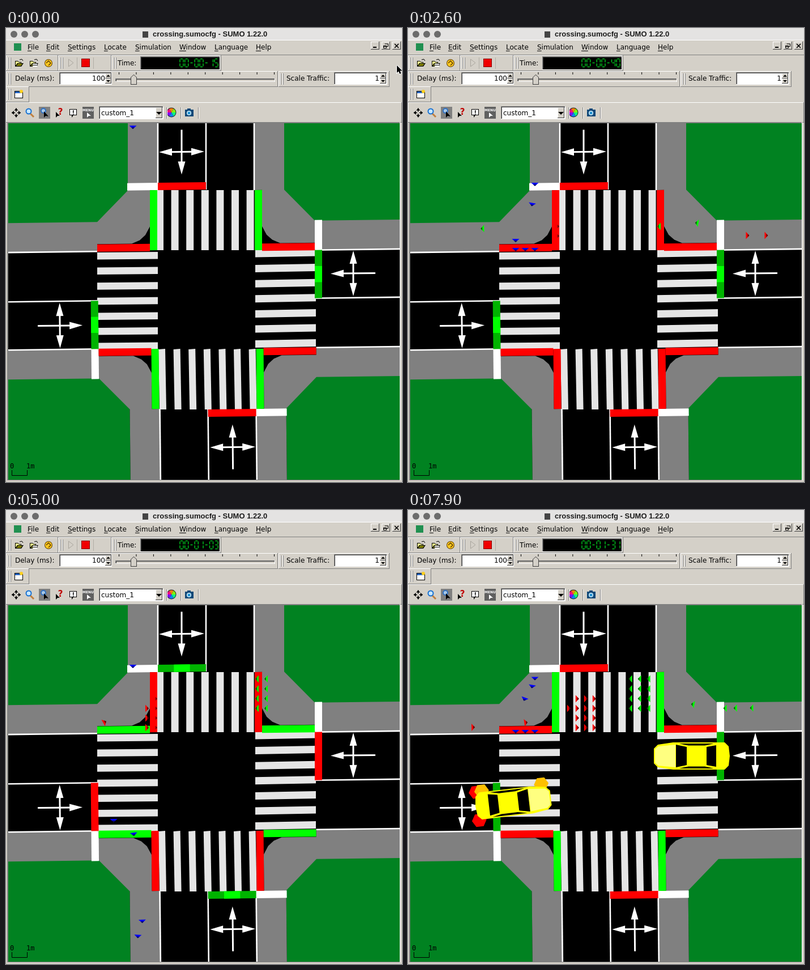
Recreate the animation shown at these times as an HTML page with a canvas. Size 699 by 801 pixels, loop 8000 ms.

```html
<!DOCTYPE html>
<html lang="en">
<head>
<meta charset="utf-8">
<title>Crossing simulation</title>
<style>
html, body { margin: 0; width: 699px; height: 801px; overflow: hidden; }
canvas { display: block; }
</style>
</head>
<body>
<canvas id="stage" width="699" height="801"></canvas>
<script>
const g = document.getElementById('stage').getContext('2d');
const SANS = '12px "DejaVu Sans", sans-serif';
const FACE = '#d4d0c8', DIM = '#808080';

function rect(color, x, y, w, h) {
  g.fillStyle = color;
  g.fillRect(x, y, w, h);
}
function trace(p) {
  g.beginPath();
  for (let i = 0; i < p.length; i += 2) g.lineTo(p[i], p[i + 1]);
}
function poly(color, ...p) {
  trace(p);
  g.fillStyle = color;
  g.fill();
}
function line(color, width, ...p) {
  trace(p);
  g.strokeStyle = color;
  g.lineWidth = width;
  g.stroke();
}
function disc(color, x, y, r) {
  g.beginPath();
  g.arc(x, y, r, 0, 7);
  g.fillStyle = color;
  g.fill();
}
function text(str, x, y, align = 'left', font = SANS, color = '#000') {
  g.font = font;
  g.textAlign = align;
  g.fillStyle = color;
  g.fillText(str, x, y);
}
function placed(x, y, angle, draw) {
  g.save();
  g.translate(x, y);
  g.rotate(angle);
  draw();
  g.restore();
}

// ---- Window frame and toolbars ----
function sunken(x, y, w, h, fill = '#fff') {
  rect('#fff', x, y, w, h);
  rect(DIM, x, y, w - 1, h - 1);
  rect('#404040', x + 1, y + 1, w - 2, h - 2);
  rect(fill, x + 2, y + 2, w - 3, h - 3);
}
function raised(x, y, w, h, shade = '#404040') {
  rect(shade, x, y, w, h);
  rect('#fff', x, y, w - 1, h - 1);
  rect(FACE, x + 1, y + 1, w - 2, h - 2);
}
function toolbar(x, y, w, h = 28) {
  raised(x, y, w, h, DIM);
  if (h < 30) for (const d of [3, 7]) {
    rect('#fff', x + d, y + 4, 1, h - 8);
    rect(DIM, x + d + 1, y + 4, 1, h - 8);
  }
}
function spinner(x, y) {
  for (const d of [-1, 1]) {
    const cy = y + d * 4.5;
    raised(x, cy - 4.5, 11, 9);
    poly('#000', x + 2, cy - d * 1.5, x + 9, cy - d * 1.5, x + 5.5, cy + d * 2);
  }
}
function folder(x, y) {
  poly('#000', x - 7, y - 4, x - 2, y - 4, x, y - 2, x + 4, y - 2, x + 4, y, x + 8, y, x + 4, y + 6, x - 7, y + 6);
  poly('#ffff90', x - 6, y - 3, x - 2, y - 3, x, y - 1, x + 3, y - 1, x + 3, y, x - 3, y, x - 6, y + 4);
  poly('#808000', x - 2, y + 1, x + 6, y + 1, x + 3, y + 5, x - 5, y + 5);
  line('#000', 1, x + 1, y - 6, x + 5, y - 7, x + 7, y - 4);
}
function menus() {
  const left = { File: 38, Edit: 71, Settings: 109, Locate: 173, Simulation: 228, Window: 306, Language: 368, Help: 441 };
  for (const [name, x] of Object.entries(left)) {
    text(name, x, 38);
    rect('#000', x, 40, g.measureText(name[0]).width, 1);
  }
}
function viewIcons() {
  for (let i = 0; i < 4; i++)
    placed(18, 149.5, i * Math.PI / 2, () => {
      line('#000', 1.5, 2, 0, 8, 0);
      poly('#000', 8, 0, 4, -3.5, 4, 3.5);
    });
  line('#c08040', 3, 43, 151, 49, 157);
  disc('#1870d0', 40, 147, 5.5);
  disc('#c8e8ff', 40, 147, 3.5);
  rect(DIM, 58, 139, 20, 21);
  disc('#3070c0', 66, 146, 5);
  disc('#a8c8e8', 66, 146, 3);
  poly('#000', 67, 147, 67, 158, 70, 155, 75, 156);
  text('?', 96, 153, 'center', 'bold 15px "DejaVu Sans", sans-serif', '#c00000');
  poly('#000', 88, 148, 88, 158, 91, 155, 95, 155);
  poly('#000', 112, 143, 125, 143, 125, 154, 119, 154, 116, 158, 116, 154, 112, 154);
  rect('#fff', 113, 144, 11, 9);
  rect('#000', 118, 145, 1.5, 5);
  rect('#000', 118, 151, 1.5, 1.5);
  rect('#606060', 135, 139, 20, 21);
  text('MENU', 145, 147, 'center', 'bold 6px "DejaVu Sans", sans-serif', '#fff');
  poly('#fff', 143, 149, 143, 158, 146, 155, 150, 155);
  sunken(164, 138, 114, 23);
  text('custom_1', 168, 154);
  raised(264, 140, 12, 19);
  poly('#000', 265, 148, 275, 148, 270, 153);
  disc('#202020', 292, 149, 8.5);
  for (let i = 0; i < 6; i++) {
    g.beginPath();
    g.moveTo(292, 149);
    g.arc(292, 149, 7.5, i * 1.047, (i + 1) * 1.047);
    g.fillStyle = `hsl(${150 + i * 60} 90% 50%)`;
    g.fill();
  }
  rect('#104878', 316, 144, 15, 12);
  rect('#104878', 320, 142, 6, 3);
  disc('#d0f0ff', 323, 150, 4);
  disc('#2090d0', 323, 150, 2.5);
  for (const x of [283, 308, 339]) {
    rect(DIM, x, 140, 1, 20);
    rect('#fff', x + 1, 140, 1, 20);
  }
}
// Lit segments as bits: top, two right, bottom, two left, middle
const SEGMENTS = { 0: 63, 1: 6, 2: 91, 3: 79, 4: 102, 5: 109, 6: 125, 7: 7, 8: 127, 9: 111, '-': 64 };
function digit(ch, x, y) {
  [[1, 0, 5, 0], [6, 1, 6, 6], [6, 8, 6, 13], [1, 14, 5, 14], [0, 8, 0, 13], [0, 1, 0, 6], [1, 7, 5, 7]]
    .forEach(([a, b, c, d], i) => {
      if (SEGMENTS[ch] >> i & 1) line('#00d020', 1.4, x + a, y + b, x + c, y + d);
    });
}
function clock(s) {
  const two = n => String(n).padStart(2, '0');
  sunken(237, 50, 141, 24, '#000');
  [...`00-${two(Math.floor(s / 60))}-${two(s % 60)}`].forEach((c, i) => digit(c, 307 + i * 8.75, 54.5));
}
function chrome(s) {
  rect(FACE, 0, 0, 699, 801);
  rect('#e4e3e2', 0, 0, 699, 21);
  for (const x of [14, 33, 52]) disc('#6c6c6c', x, 11, 6);
  rect('#444', 241, 6, 10, 11);
  text('crossing.sumocfg - SUMO 1.22.0', 259, 15, 'left', 'bold 13px "Liberation Sans", sans-serif', '#1c1c1c');
  rect('#fff', 0, 21, 699, 1);
  rect('#209050', 14, 27, 13, 13);
  menus();
  for (const x of [644, 663, 682]) raised(x, 24, 15, 14);
  rect('#000', 648, 33, 6, 2);
  line('#000', 1, 668.5, 28, 674.5, 28, 674.5, 32.5, 667, 32.5);
  line('#000', 1, 666.5, 31.5, 671.5, 31.5, 671.5, 35.5, 666.5, 35.5, 666.5, 31);
  line('#000', 1.6, 686, 28, 693, 35);
  line('#000', 1.6, 693, 28, 686, 35);

  rect(DIM, 0, 47, 699, 1);
  toolbar(0, 48, 92);
  toolbar(92, 48, 94);
  toolbar(186, 48, 194);
  toolbar(0, 76, 480);
  toolbar(481, 76, 196);
  toolbar(0, 103, 41);
  toolbar(0, 131, 699, 36);

  folder(23, 62);
  folder(49, 62);
  rect('#fff', 47, 63, 8, 5);
  line('#000', 1, 46, 65.5, 56, 65.5);
  disc('#604000', 75, 62, 7);
  disc('#ffc820', 75, 62, 6);
  line('#604000', 1.5, 71, 62, 75, 58, 79, 62, 75, 66);
  line('#a8a49c', 1, 110.5, 55, 119, 61.5, 110.5, 68, 110.5, 55);
  rect('#800', 133, 54, 15, 15);
  rect('#f00000', 134, 55, 13, 13);
  for (const x of [125, 154]) rect('#b0aca4', x, 52, 1, 20);
  text('Time:', 197, 66);
  clock(s);

  text('Delay (ms):', 16, 93);
  sunken(94, 78, 93, 22);
  text('100', 175, 93, 'right');
  spinner(175, 89);
  sunken(193, 89, 282, 6, FACE);
  for (let i = 0; i < 10; i++) rect('#000', 199 + i * 30.45, 78, 1, 4);
  poly('#404040', 220, 87, 225.5, 82, 231, 87, 231, 100, 220, 100);
  poly(FACE, 221, 87, 225.5, 83, 230, 87, 230, 99, 221, 99);
  text('Scale Traffic:', 495, 93);
  sunken(579, 78, 94, 22);
  text('1', 659, 93, 'right');
  spinner(660, 89);

  rect('#000', 15, 111, 15, 13);
  rect('#fff', 16, 114, 13, 9);
  rect('#2060c0', 16, 112, 13, 3);
  disc('#ffd020', 27, 112, 3);
  viewIcons();
  rect(DIM, 2, 166, 694, 632);
  rect('#fff', 695, 166, 1, 632);
}

// ---- Road network: one corner, mirrored four times with a slight tilt ----
function eachCorner(draw) {
  for (const sy of [1, -1])
    for (const sx of [1, -1]) {
      const x = (sx > 0 ? 268 : 438) + (sy > 0 ? 0 : 2.5), y = sy > 0 ? 393 : 565;
      g.save();
      g.transform(sx, -0.012 * sx, sy > 0 ? 0 : -0.01, sy, x, y);
      draw(sx === sy);
      g.restore();
    }
}
function arrow(x, y, angle) {
  placed(x, y, angle, () => {
    line('#fff', 3, 0, -39, 0, 18);
    line('#fff', 3, -20, 0, 20, 0);
    for (const turn of [-1, 0, 1])
      placed(0, 0, turn * Math.PI / 2, () => poly('#fff', 0, 40, -6.5, 17, 6.5, 17));
  });
}
function ground(vertical) {
  rect('#018221', -300, -260, 247, 209);
  poly(DIM, 0, -260, -53, -260, -53, -107, -107, -52, -300, -52, -300, 0, -107, 0, -107, -13,
    -46, -13, -32, -19, -22, -28, -14, -43, -14, -107, 0, -107);
  line('#fff', 2.6, 0, -260, 0, -107);
  line('#fff', 2.6, -300, 0, -107, 0);
  if (vertical) {
    line('#fff', 2.6, 85, -260, 85, -107);
    rect('#fff', -54, -120, 54, 13);
    arrow(42, -174, 0);
  } else {
    line('#fff', 2.6, -300, 85, -107, 85);
    rect('#fff', -120, -53, 13, 53);
    arrow(-175, 42, -Math.PI / 2);
  }
}
function zebras() {
  for (let i = 0; i < 7; i++) {
    const d = i * 26.6, c = '#e5e5e5';
    const x = 269 + d, y = 395 + d, e = 389.5 + d, left = Math.max(265 + d, 267);
    rect(c, left, 286, 278 + d - left, 106);
    poly(c, x, 567, x + 12, 566, x + 14, 673, x + 2, 673);
    poly(c, 161, y + 1, 268, y, 268, y + 12.5, 161, y + 13.5);
    poly(c, 440, e + 2, 547, e, 547, e + 13, 440, e + 15);
  }
}
const CYCLE = 90;
function carSignal(phase, x, y, w, h) {
  const color = phase < 42 ? 'lime' : phase < 45 ? '#ff0' : '#f00';
  if (phase >= 42) return rect(color, x, y, w, h);
  rect('#00b300', x, y, w, h);
  if (w > h) rect(color, x + w / 3, y, w / 3, h);
  else rect(color, x, y + h / 3, w, h / 3);
}
function signals(s) {
  const across = s % CYCLE, along = (s + 45) % CYCLE;
  const walkSignal = phase => phase < 37 ? 'lime' : '#f00';
  eachCorner(vertical => {
    rect(walkSignal(along), -107, -12.5, 93, 13);
    rect(walkSignal(across), -14, -107, 13, 106);
    if (vertical) carSignal(along, 0, -120, 85, 13);
    else carSignal(across, -120, 0, 13, 85);
  });
}

// ---- Pedestrians ----
const SPEED = 36;
// entries: second at which each person comes into view; opens: start of the walk phase;
// lead: how early the queue sets off; exit: what follows the far kerb
const streams = [
  {
    color: '#0f0', facing: [-1, 0], opens: 0, lead: 0.4, pace: SPEED,
    entries: [24.2, 31.7, 34.7, 41.9, 42.4, 43, 43.6, 46.9, 55.8, 63.5, 64.8, 65.4, 66.1, 85.5, 87.1, 87.6, 88.4],
    start: [[700, 348], [545, 350]],
    slot: i => [443 + 16 * (i >> 2), 350 - 17.3 * (i & 3)],
    exit: y => [[254, y[1]], [180, 352], [-20, 360]]
  },
  {
    color: '#f00', facing: [1, 0], opens: 0, lead: 0.8, pace: SPEED,
    entries: [17.7, 22.4, 23.3, 29.4, 30.3, 41.9, 42.4, 47.4, 51, 52.7, 58.1, 63.5, 67.9, 73.3, 76.1, 76.6, 85.2, 87.8],
    start: [[0, 387], [160, 382]],
    slot: i => [264 - 15 * (i >> 2), 333 + 17 * (i + 1 & 3)],
    exit: y => [[449, y[1]], [545, 366], [720, 366]]
  },
  {
    color: '#00f', facing: [0, 1], opens: 45, lead: 1, pace: 30,
    entries: [14.8, 21, 30, 32.7, 36, 37, 45.2, 46.4, 51.7, 52.3, 60, 64.6, 65, 75.3, 76.8, 79.8, 86.3, 87, 87.4],
    start: [[224, 168], [224, 285]],
    slot: i => [190 + 17 * (i % 3), 391 - 16 * Math.floor(i / 3)],
    exit: ([x]) => [[x, 560], [238, 667], [x > 200 ? 245 : 228, 830]]
  }
];
// Timed points of every person: walk in, queue while the light is red, cross, leave
function plan({ entries, start, slot, exit, opens, lead, pace }) {
  const waiting = {};
  return entries.map((entry, n) => {
    const keys = [[...start[0], entry]];
    const go = (points, speed) => points.forEach(([x, y]) => {
      const [px, py, t] = keys.at(-1);
      keys.push([x, y, t + Math.hypot(x - px, y - py) / speed]);
    });
    const kerb = slot(0), [bx, by] = start[1];
    go([start[1]], SPEED);
    const arrival = keys[1][2] + Math.hypot(kerb[0] - bx, kerb[1] - by) / SPEED;
    const phase = (arrival - opens + CYCLE) % CYCLE;
    let place = slot(n % 3);
    if (phase < 36) go([place], SPEED);
    else {
      const open = Math.round(arrival + CYCLE - phase);
      waiting[open] = (waiting[open] ?? -1) + 1;
      place = slot(waiting[open]);
      go([place], SPEED);
      keys.push([...place, Math.max(open - lead, keys.at(-1)[2])]);
    }
    const [far, ...rest] = exit(place);
    go([far], SPEED);
    go(rest, pace);
    return keys;
  });
}
for (const stream of streams) stream.people = plan(stream);

function pedestrians({ color, facing, people }, s) {
  for (const keys of people) {
    const i = keys.findLastIndex(k => k[2] <= s), a = keys[i], b = keys[i + 1];
    if (!a || !b) continue;
    const p = (s - a[2]) / (b[2] - a[2]), vx = b[0] - a[0], vy = b[1] - a[1];
    const angle = vx || vy ? Math.atan2(vy, vx) : Math.atan2(facing[1], facing[0]);
    placed(a[0] + vx * p, a[1] + vy * p, angle, () => {
      poly(color, 3, 0, -3, -6.5, -3, 6.5);
      poly('rgba(0,0,0,.6)', 3, 0, 0, -3.2, 0, 3.2);
    });
  }
}

// ---- Cars: brake to a stop, wait, pull away ----
const LENGTH = 134, TURN_AT = 170, RADIUS = 226;
function leftTurn(d) {
  const bend = Math.max(0, d - TURN_AT), a = Math.min(bend / RADIUS, Math.PI / 2);
  return [Math.min(d, TURN_AT) + RADIUS * Math.sin(a), 523 - RADIUS * (1 - Math.cos(a)) - (bend - a * RADIUS)];
}
const straight = d => [700 - d, 434];
const cars = [
  { path: leftTurn, stop: 113, arrive: 35, leave: 35, push: 60 },
  { path: leftTurn, stop: 134, arrive: 66, leave: 89, push: 30 },
  { path: straight, stop: 126, arrive: 66, leave: 89, push: 35 }
];
function mirrored(color, ...p) {
  const back = [];
  for (let i = p.length - 2; i >= 0; i -= 2) back.push(p[i], -p[i + 1]);
  poly(color, ...p, ...back);
}
function lamp(color, x, y) {
  poly(color, x + 13, y, x + 6.5, y + 11, x - 6.5, y + 11, x - 13, y, x - 6.5, y - 11, x + 6.5, y - 11);
}
function drawCar({ path, stop, arrive, leave, push }, s) {
  const d = stop - 19 * Math.max(0, arrive - s) ** 2 + push * Math.max(0, s - leave) ** 2;
  const [x, y] = path(d), [rx, ry] = path(d - LENGTH);
  placed(x, y, Math.atan2(y - ry, x - rx), () => {
    if (path === leftTurn) {
      for (const side of [-25, 25]) lamp('#f00', -130, side);
      for (const along of [-14, -120]) lamp('#ffc000', along, -26);
    }
    mirrored('#ff0', 0, -13, -7, -20, -34, -24, -125, -24, -132, -17, -LENGTH, 0);
    mirrored('#ffff80', -2, -12, -8, -17, -38, -20);
    mirrored('#000', -39, -20, -58, -16);
    mirrored('#000', -93, -16, -110, -19);
    for (const side of [-1, 1])
      poly('#000', -44, 22 * side, -61, 18.5 * side, -90, 18.5 * side, -106, 22 * side);
  });
}

function scaleBar() {
  const font = '12px "DejaVu Sans Mono", monospace';
  line('#000', 1, 10.5, 780, 10.5, 789.5, 37.5, 789.5, 37.5, 780);
  text('0', 7, 777, 'left', font);
  text('1m', 36, 777, 'left', font);
}
function pointer(x, y) {
  placed(x, y, 0, () => {
    const shape = [0, 0, 0, 13, 3, 10.5, 5, 15, 7.5, 14, 5.5, 9.5, 9.5, 9.5, 0, 0];
    line('#fff', 2, ...shape);
    poly('#000', ...shape);
  });
}

function frame() {
  const step = Math.floor(performance.now() % 8000 / 100);
  const s = 15 + Math.round(step * 76 / 79);
  chrome(s);
  g.save();
  g.beginPath();
  g.rect(4, 168, 691, 629);
  g.clip();
  rect('#000', 4, 168, 691, 629);
  eachCorner(ground);
  zebras();
  signals(s);
  streams.forEach(stream => pedestrians(stream, s));
  cars.forEach(car => drawCar(car, s));
  scaleBar();
  g.restore();
  if (step < 4) pointer(690 + step * 4, 66);
  requestAnimationFrame(frame);
}
frame();
</script>
</body>
</html>
```
